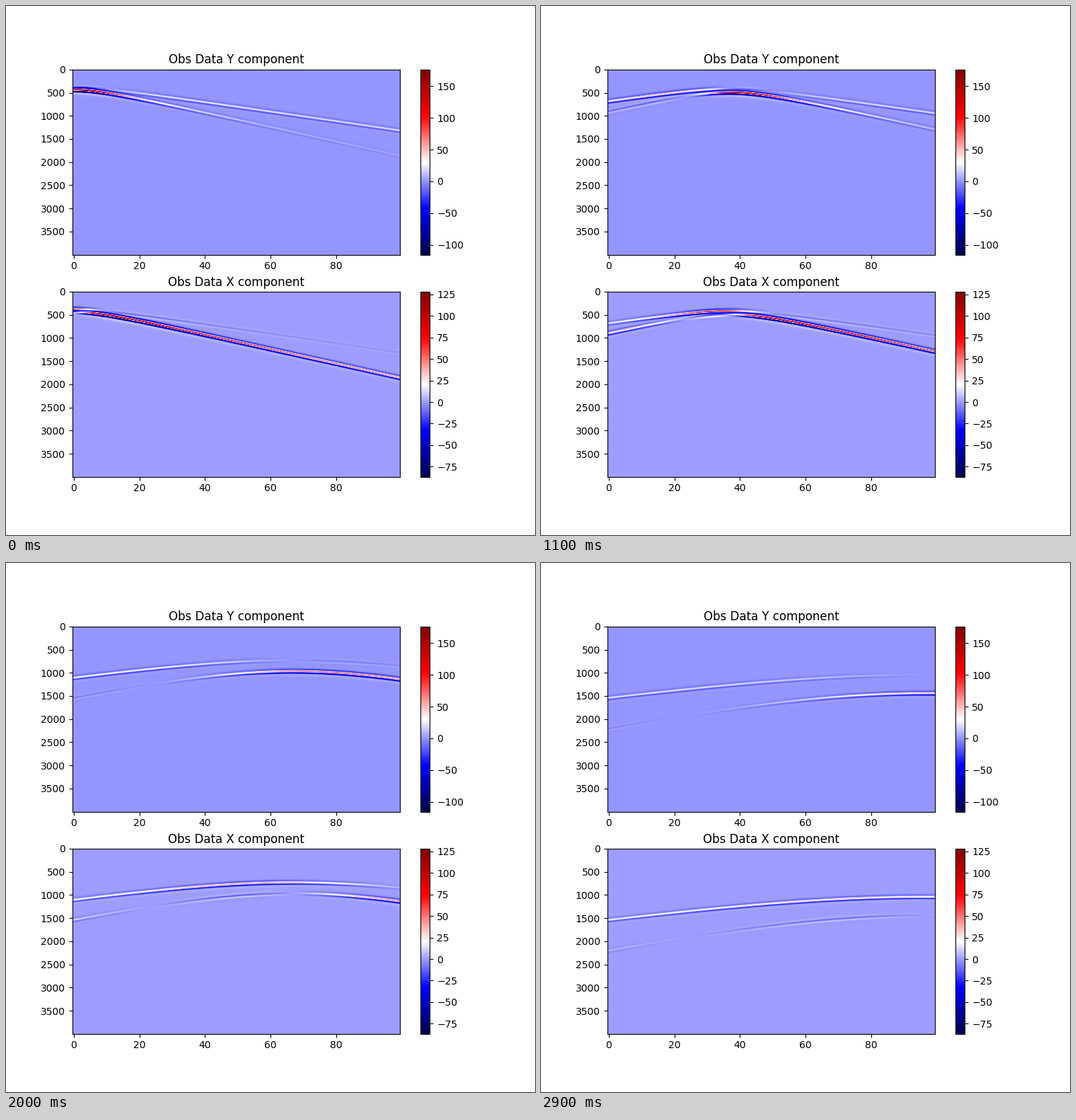
A matplotlib script for the animation above (3000 ms loop, 748 px wide and 748 px high).

```python
import numpy as np
import matplotlib.pyplot as plt
from matplotlib.animation import FuncAnimation

FRAMES, INTERVAL = 30, 100
SAMPLES, RECEIVERS = 4000, 100
DELAY = 274                     # arrival time at zero distance
SLOW_P, SLOW_S = 10.4, 15.85    # samples per grid cell
PULSE = 31.8                    # samples per unit of pulse time
STRENGTH = 510

time = np.arange(SAMPLES)[:, None]
receivers = np.arange(RECEIVERS)


def make_pulse(n=4096, step=0.01):
    """Half-derivative of a Ricker pulse, with its peak of 1 at time 0."""
    t = (np.arange(n) - n // 2) * step
    ricker = (1 - 2 * t**2) * np.exp(-t**2)
    omega = 2 * np.pi * np.fft.rfftfreq(n, step)
    pulse = np.fft.irfft(np.fft.rfft(ricker) * np.sqrt(1j * omega), n)
    peak = pulse.argmax()
    return t - t[peak], pulse / pulse[peak]


pulse_t, pulse_v = make_pulse()


def arrival(dist, slowness):
    tau = (time - DELAY - slowness * dist) / PULSE
    return np.interp(tau, pulse_t, pulse_v, left=0, right=0)


def shot(i):
    """Horizontal (Y) and vertical (X) records of a diagonal point force."""
    source = i * RECEIVERS / FRAMES
    depth = 10 + (110 * i % 300) / 3
    offset = receivers - source
    dist = np.hypot(offset, depth)
    h, v = offset / dist, -depth / dist
    amp = STRENGTH / np.sqrt(dist)
    p = arrival(dist, SLOW_P) * amp * (SLOW_P / SLOW_S)**1.5
    s = arrival(dist, SLOW_S) * amp
    return (p * h * (h + v) + s * v * (v - h),
            p * v * (h + v) + s * h * (h - v))


fig, axes = plt.subplots(2, 1, figsize=(7.48, 7.48), dpi=100)
limits = [(-115.5, 176.4), (-86.9, 128.3)]
images = []
for ax, name, data, (low, high) in zip(axes, "YX", shot(0), limits):
    image = ax.imshow(data, cmap="seismic", aspect="auto", vmin=low, vmax=high)
    ax.set_title(f"Obs Data {name} component")
    fig.colorbar(image, ax=ax)
    images.append(image)


def update(i):
    for image, data in zip(images, shot(i)):
        image.set_data(data)
    return images


anim = FuncAnimation(fig, update, frames=FRAMES, interval=INTERVAL,
                     repeat=True, repeat_delay=0)
plt.show()
```
